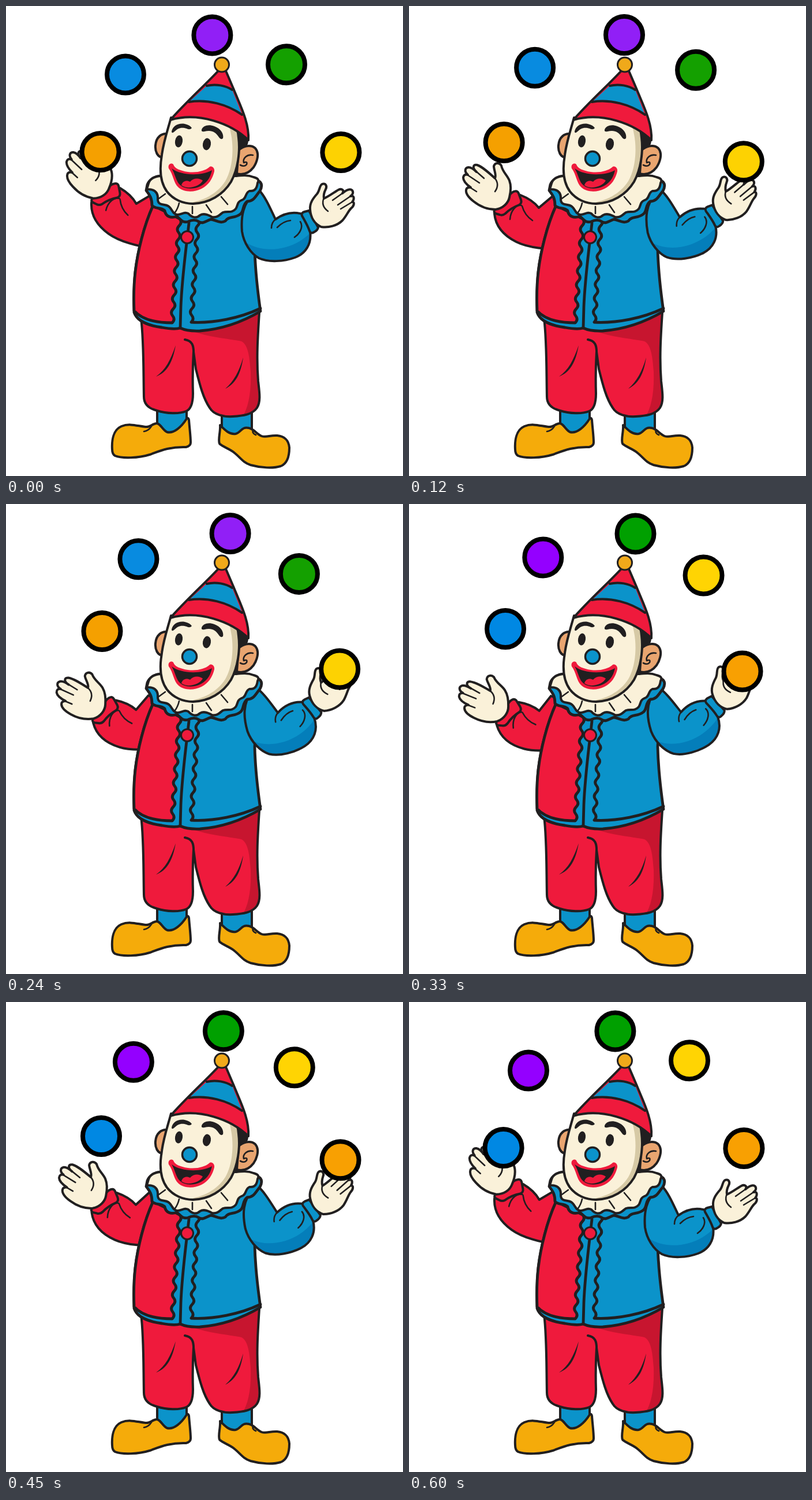
Animation, 688 px wide and 813 px high, one loop 0.63 s. Source, as an HTML page:

```html
<!DOCTYPE html>
<html lang="en">
<head>
<meta charset="utf-8">
<title>Juggling clown</title>
<style>
html, body { margin: 0; width: 100%; height: 100%; overflow: hidden; background: #fff; }
svg { display: block; width: 100%; height: 100%; }
.o { stroke: #211f20; stroke-width: 4; stroke-linejoin: round; stroke-linecap: round; }
.w { stroke-width: 4.8; }
.l { fill: none; stroke: #211f20; stroke-width: 2.6; stroke-linecap: round; stroke-linejoin: round; }
.r { fill: #ef1a3c; }
.b { fill: #0b93ca; }
.c { fill: #faf1d9; }
.y { fill: #f5ab0a; }
.s { fill: #e9a570; }
.k { fill: #211f20; }
.n { fill: none; }
#balls circle { stroke: #000; stroke-width: 8; }
</style>
</head>
<body>
<svg viewBox="0 0 688 813" xmlns="http://www.w3.org/2000/svg">
  <!-- red arm -->
  <g id="armL">
    <path class="o r" d="M193 327C206 332 217 339 225 349L250 328L272 340L270 420C240 422 206 418 186 408C164 397 150 382 148 359L165 345Z"/>
    <path class="l" d="M195 345C186 343 176 354 175 369M196 346C199 357 205 365 214 371"/>
    <path class="o r" d="M178 323Q187 317 190 324L194 335Q196 341 191 344C183 347 174 352 167 359Q162 363 157 361L150 359Q145 356 150 350Z"/>
    <path class="o c" d="M150 352C136 352 122 346 112 338C103 331 98 324 99 318Q100 313 107 314C100 309 94 303 94 297Q95 290 102 292C96 287 96 280 103 279C108 279 113 283 117 287C109 280 111 274 118 275C127 278 138 288 149 298C152 292 147 284 147 277C149 271 156 270 160 276C162 287 170 292 174 302C177 310 177 319 174 331C172 341 163 350 150 352Z"/>
    <path class="l" d="M114 284L130 298M101 292L122 306M106 314L117 321M149 298C155 306 154 314 149 321"/>
  </g>

  <!-- socks and shoes -->
  <path class="o b" d="M262 695H313V738H262ZM374 702H426V742H374Z"/>
  <path class="o y" d="M184 767C183 751 186 733 200 727C215 721 229 727 242 728C251 729 255 721 262 722C269 724 271 733 279 737C291 740 304 728 313 714Q316 711 317 716C318 730 320 744 320 755Q320 761 312 763C285 762 268 769 249 776C230 782 201 783 189 778Q184 775 184 767Z"/>
  <path class="o y" d="M371 725C372 736 367 750 370 757C376 763 388 766 396 773C406 781 411 790 424 794C442 799 463 800 476 796C489 791 491 776 491 764C490 750 481 744 470 743C458 742 451 747 443 744C434 740 430 732 421 730C408 727 407 738 398 740C387 742 378 732 371 725Z"/>
  <path class="l" d="M252 727Q247 735 239 736M428 734Q426 739 433 742"/>

  <!-- trousers -->
  <path class="r" d="M234 540C239 580 238 630 239 676C239 691 250 697 262 700C278 705 300 706 312 701C322 697 324 684 324 670V600L329 628C336 656 342 679 353 695C360 707 377 711 393 710C410 709 427 707 435 695C442 684 439 667 437 649C434 610 436 575 439 530Z"/>
  <path fill="#c7152f" d="M322 562C350 573 384 575 408 580C420 586 422 608 424 632C425 662 422 688 412 707C427 705 441 699 439 676C434 620 435 575 439 530Z"/>
  <path class="o n" d="M234 540C239 580 238 630 239 676C239 691 250 697 262 700C278 705 300 706 312 701C322 697 324 684 324 670C323 640 324 615 325 598L329 628C336 656 342 679 353 695C360 707 377 711 393 710C410 709 427 707 435 695C442 684 439 667 437 649C434 610 436 575 439 530M310 577C322 579 326 586 325 604"/>
  <path class="k" d="M294 587C289 616 279 634 260 641C276 630 285 613 294 587ZM411 608C407 637 397 654 380 662C395 649 404 632 411 608Z"/>

  <!-- jacket -->
  <path class="o w b" d="M255 345C239 380 228 425 224 460C221 490 222 510 222 530C227 545 247 553 270 556Q292 560 302 557Q315 563 336 562C375 559 409 547 441 528C437 500 432 465 431 420L436 325Z"/>
  <path id="panel" class="o w r"/>
  <path id="trim" class="o w n"/>
  <path class="o w n" d="M317 376C312 420 305 470 303 520L302 557"/>
  <circle class="o r" cx="314" cy="400" r="10.5" style="stroke-width:3"/>

  <!-- blue arm -->
  <g id="armR">
    <path class="b" d="M438 318C449 329 458 350 467 369C481 359 497 355 514 360L527 390C530 412 519 428 501 435C482 442 455 444 438 436C424 428 412 410 409 390C407 365 410 341 432 322Z"/>
    <path fill="#047eba" d="M416 409C444 428 494 425 527 393C530 412 519 428 501 435C482 442 455 444 438 436C428 430 420 420 416 409Z"/>
    <path class="o n" d="M438 318C449 329 458 350 467 369C481 359 497 355 514 360L527 390C530 412 519 428 501 435C482 442 455 444 438 436C424 428 412 410 409 390C407 365 410 341 432 322Z"/>
    <path class="l" d="M467 369C462 373 460 378 460 384M493 371Q481 372 470 383M510 373C516 382 509 394 500 400"/>
    <path class="o b" d="M513 363Q511 358 517 356L525 354L541 383Q540 388 534 391Q528 395 526 389C523 380 518 372 513 363Z"/>
    <path class="o c" d="M527 352C526 341 532 333 539 325C544 319 543 310 548 308C554 306 557 312 554 317C551 323 550 328 551 333C560 329 569 322 576 318C582 315 587 319 583 324C589 319 596 315 600 319C603 323 600 327 597 329C604 327 604 334 600 339C605 339 603 346 598 350C593 355 590 363 583 371C574 380 559 384 546 382C535 377 528 366 527 352Z"/>
    <path class="l" d="M583 324L566 336M597 329L575 344M600 339L580 351M551 332C547 341 550 349 558 355"/>
  </g>

  <!-- collar -->
  <path class="o w b" d="M268 294C256 295 248 301 245 309L243 319C248 326 253 331 253 345C259 352 268 347 275 354C277 365 286 367 296 364C302 368 305 376 316 373C322 370 328 369 334 373C341 378 348 371 355 369C364 370 371 377 380 372C386 363 396 368 406 360C413 355 409 344 418 338C430 338 433 328 440 320C444 313 444 306 438 303L400 292Z"/>
  <path class="o c" d="M268 294C256 295 249 300 247 307L244 317C256 316 264 322 263 334C263 346 275 342 281 346C288 350 288 360 297 361C305 361 309 355 316 359C322 366 330 368 336 362C343 358 350 361 357 365C367 367 371 360 376 357C384 354 391 359 398 351C402 346 400 339 408 336C417 334 414 323 422 320C433 321 435 313 436 306C439 301 437 298 429 296C419 292 409 293 399 294Z"/>
  <path class="l" d="M276 325L265 333M300 341Q298 350 293 357M323 347V359M347 344L356 357M373 330L384 343"/>

  <!-- head -->
  <path class="o s" d="M283 222C269 218 260 228 259 241C258 252 263 262 272 262Z"/>
  <path class="k" d="M393 200L418 225C422 234 419 243 413 246L400 262Z"/>
  <path class="o s" d="M403 250C410 242 424 239 432 246C440 255 435 270 429 279C422 288 412 293 400 290Z"/>
  <path class="l" d="M428 258C418 256 410 263 412 271Q419 268 417 274Q413 279 406 275"/>
  <path fill="#d6c9a5" d="M286 193C281 212 273 234 270 258C266 281 267 305 279 321C290 335 307 342 324 342C352 341 376 327 390 304C402 282 406 252 403 228Q402 213 396 202Z"/>
  <path class="c" d="M286 193C281 212 273 234 270 258C266 281 267 305 279 321C288 332 300 339 313 341C341 338 366 325 380 303C393 281 395 246 390 222Q388 208 382 198Z"/>
  <path class="o n" d="M286 193C281 212 273 234 270 258C266 281 267 305 279 321C290 335 307 342 324 342C352 341 376 327 390 304C402 282 406 252 403 228Q402 213 396 202"/>
  <path class="k" d="M287 217C289 207 299 202 310 204Q319 206 322 211Q319 215 313 212C304 209 298 211 291 218Q287 221 287 217ZM339 214C341 207 351 204 361 208C372 212 378 221 376 229Q372 232 369 227C363 217 355 214 344 217Q338 218 339 214Z"/>
  <ellipse class="k" cx="299.500" cy="234" rx="6.500" ry="10.500" transform="rotate(9 299 234)"/>
  <ellipse class="k" cx="348" cy="239" rx="7" ry="10.500" transform="rotate(9 348 239)"/>
  <circle class="o b" cx="318" cy="264" r="12.500" style="stroke-width:3.500"/>
  <path class="r" d="M282 281C280 275 285 270 290 274C292 281 302 285 315 287C331 289 345 285 352 279C356 275 362 280 361 286C358 299 351 310 339 316C325 323 308 322 299 314C290 306 290 291 282 281Z"/>
  <path class="k" d="M287 281C303 293 337 295 357 284C354 299 346 308 334 313C321 318 307 316 300 308C294 301 293 290 287 281Z"/>
  <path class="r" d="M304 310C306 302 314 301 319 304C325 297 335 297 341 302C335 313 314 318 304 310Z"/>

  <!-- hat -->
  <path class="r" d="M369 111C350 132 309 169 285 197C334 183 390 203 420 232C422 202 405 170 395 145L380 110Z"/>
  <path class="b" d="M349 137C365 134 381 138 392 145L409 188C383 170 350 161 317 166Z"/>
  <path class="o n" d="M369 111C350 132 309 169 285 197C334 183 390 203 420 232C422 202 405 170 395 145L380 110ZM348 138C364 134 381 138 392 145M317 166C350 161 383 170 409 188"/>
  <circle class="o" fill="#f0a91a" cx="374" cy="101.500" r="12.500" style="stroke-width:3"/>

  <g id="balls"></g>
</svg>
<script>
const $ = id => document.getElementById(id);
const LOOP = 630, STEP = 30, TURN = 10;

// Scalloped edge running from (x0,y0) to (x1,y1)
function wave(x0, y0, x1, y1, n, bulge) {
  const dx = (x1 - x0) / n, dy = (y1 - y0) / n;
  return `M${x0} ${y0}q${bulge} ${dy / 2} ${dx} ${dy}` + `t${dx} ${dy}`.repeat(n - 1);
}
$('panel').setAttribute('d', wave(301, 368, 288, 548, 15, 5) +
  'C262 548 236 543 222 527C221 505 221 485 224 460C228 425 239 380 255 345Z');
$('trim').setAttribute('d', wave(333, 368, 321, 547, 15, 5) +
  'C360 549 405 540 441 523');

const before = ['#f5a000', '#088be0', '#911ff6', '#14a000', '#fdd202'];
const after = ['#0088e3', '#9400ff', '#00a000', '#ffd403', '#f8a002'];

// Each place: start, speed and bend along x, then along y
const paths = [
  [163.6, .16, .025, 252, -4, 0],
  [207, 2.75, .007, 118.5, -3, .012],
  [357.4, 3.9, 0, 50.4, -.25, .04],
  [486, 2.8, -.008, 101.2, 2.35, .014],
  [580.4, 0, -.035, 253, 4.06, 0]
];
const balls = paths.map(() => {
  const c = document.createElementNS('http://www.w3.org/2000/svg', 'circle');
  c.setAttribute('r', 32);
  return $('balls').appendChild(c);
});

function draw(ms) {
  const step = Math.floor((ms % LOOP) / STEP);
  const p = TURN - Math.abs(step - TURN);
  const colors = step < TURN ? before : after;
  paths.forEach(([x, vx, ax, y, vy, ay], i) => {
    balls[i].setAttribute('cx', x + vx * p + ax * p * p);
    balls[i].setAttribute('cy', y + vy * p + ay * p * p);
    balls[i].setAttribute('fill', colors[i]);
  });
  $('armL').setAttribute('transform', `rotate(${-2.35 * (p - 4)} 268 350)`);
  $('armR').setAttribute('transform', `rotate(${-1.45 * p} 430 345)`);
}

const start = performance.now();
function tick() {
  draw(performance.now() - start);
  requestAnimationFrame(tick);
}
draw(0);
requestAnimationFrame(tick);
</script>
</body>
</html>
```
